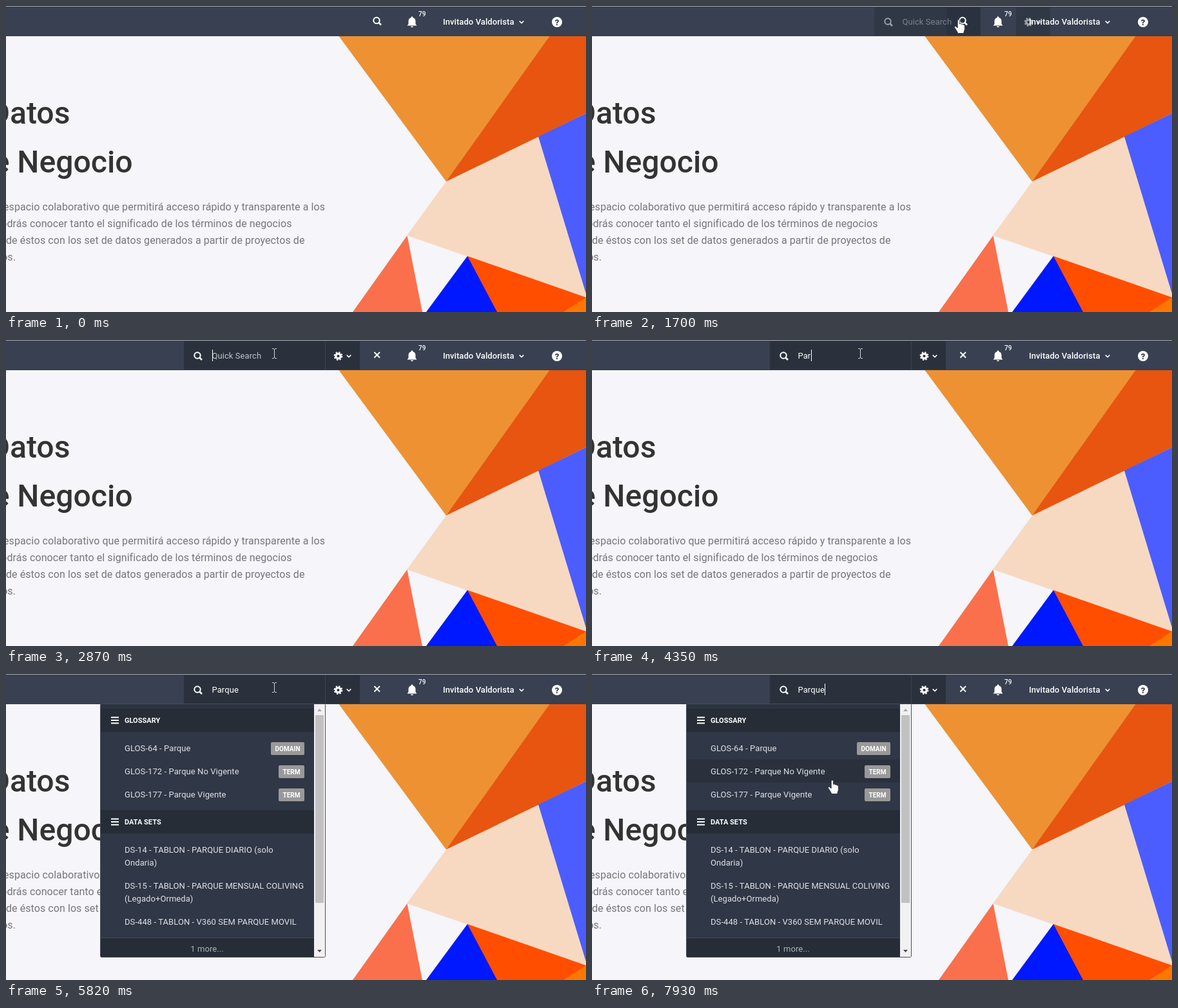
An HTML page for the animation above (8 s loop, 900 by 476 pixels).

```html
<!DOCTYPE html>
<html lang="es">
<head>
<meta charset="utf-8">
<title>Búsqueda rápida</title>
<style>
html, body { margin: 0; height: 100%; overflow: hidden; background: #f5f5fa; }
svg { display: block; width: 100vw; height: 100vh; font: 13px Roboto, sans-serif; letter-spacing: .07px; }
text { white-space: pre; }
.title { font-size: 48px; font-weight: 500; fill: #333; text-anchor: end; letter-spacing: 0; }
.body { font-size: 16px; fill: #75757b; text-anchor: end; letter-spacing: .08px; }
.head { font-size: 11px; font-weight: 700; fill: #fff; letter-spacing: 0; }
.tag { font-size: 10px; font-weight: 700; fill: #fff; text-anchor: middle; letter-spacing: 0; }
.line { fill: none; stroke: #fff; stroke-width: 2; }
</style>
</head>
<body>
<svg viewBox="0 0 900 476">
  <defs>
    <g id="lens" class="line"><circle r="4.7" cx="-1" cy="-1"/><path d="M2.5 2.5L6 6" stroke-width="2.6"/></g>
    <path id="chevron" class="line" d="M-3.3 -1.6L0 1.6L3.3 -1.6" style="stroke-width:1.5"/>
    <g id="gear"><circle r="3.7" fill="none" stroke="#fff" stroke-width="3.2"/>
      <circle r="5.9" fill="none" stroke="#fff" stroke-width="2" stroke-dasharray="2.4 2.234"/></g>
    <path id="bars" class="line" d="M0 -4.5H12M0 0H12M0 4.5H12"/>
  </defs>

  <!-- Facets overlap underneath so that no background shows at the seams -->
  <rect width="900" height="476" fill="#f5f5fa"/>
  <path fill="#f7d9c2" d="M683 273L826 203L860 220L902 454L622 357z"/>
  <path fill="#e75510" d="M830 47H900V167L826 203.5L683 273z"/>
  <path fill="#ee9133" d="M516.5 47H843.5L683 273z"/>
  <path fill="#4b5dff" d="M826 203L902 166V454z"/>
  <path fill="#fa704c" d="M622.5 357L646 476H538z"/>
  <path fill="#ff4e00" d="M716 389L902 454L880 476H730z"/>
  <path fill="#0018ff" d="M716 389L762 476H652z"/>
  <path fill="#ff7700" d="M902 452V476H865z"/>

  <text class="title" x="99.5" y="183">Datos</text>
  <text class="title" x="196.5" y="259">e Negocio</text>
  <text class="body" x="495" y="318">espacio colaborativo que permitirá acceso rápido y transparente a los</text>
  <text class="body" x="443.5" y="344">odrás conocer tanto el significado de los términos de negocios</text>
  <text class="body" x="463.5" y="370">de éstos con los set de datos generados a partir de proyectos de</text>
  <text class="body" x="15" y="396">os.</text>

  <rect width="900" height="47" fill="#384051"/>
  <rect width="900" height="1" fill="#a4a9b2"/>

  <rect id="pressed" x="550" y="2" width="53" height="44" fill="#2d3442"/>
  <g id="panel">
    <rect x="276" y="2" width="273" height="44" fill="#2a313d"/>
    <rect x="495" y="2" width="1" height="44" fill="#3a4252"/>
    <use id="panelLens" href="#lens" x="298" y="25"/>
    <circle id="spinner" class="line" r="7" stroke-dasharray="35 9" style="stroke:#d4d6da;stroke-width:1.7"/>
    <text id="query" x="319.5" y="29"></text>
    <use href="#gear" x="515.5" y="25"/>
    <use href="#chevron" x="532" y="25"/>
  </g>
  <rect id="caret" y="15" width="1" height="18" fill="#fff"/>

  <use id="openIcon" href="#lens" x="576" y="23.5"/>
  <path id="closeIcon" class="line" d="M571.5 19L580 27.5M580 19L571.5 27.5"/>
  <rect x="603" y="2" width="54" height="44" fill="#384051"/>
  <path fill="#fff" d="M622.5 30.5l2-2.5v-4.5c0-3 1.8-4.8 4.2-5.4v-.6a1.3 1.3 0 0 1 2.6 0v.6c2.4.6 4.2 2.4 4.2 5.4v4.5l2 2.5zM628 31.5h4a2 1.8 0 0 1-4 0z"/>
  <text x="640" y="16" fill="#fff" style="font-size:10px;font-weight:500">79</text>
  <text x="678" y="29" fill="#fff" style="font-weight:500">Invitado Valdorista</text>
  <use href="#chevron" x="800" y="25"/>
  <circle cx="855" cy="25" r="8" fill="#fff"/>
  <text x="855" y="29.5" fill="#384051" text-anchor="middle" style="font-weight:900">?</text>

  <g id="menu">
    <rect x="146.5" y="46.5" width="349" height="394" rx="2" fill="#303746" stroke="#454d5c"/>
    <rect x="147" y="47" width="331" height="7" fill="#2d3441"/>
    <rect id="hover" x="147" width="331" height="36" fill="#2a313d"/>
    <path fill="#262d37" d="M147 54H478V90H147zM147 212H478V248H147zM147 411H478V440H147z"/>
    <rect x="147" y="410" width="331" height="1" fill="#424957"/>
    <use href="#bars" x="163" y="72"/>
    <use href="#bars" x="163" y="230"/>
    <text class="head" x="184" y="76">GLOSSARY</text>
    <text class="head" x="184" y="234">DATA SETS</text>
    <g id="rows" fill="#dfe1e5"></g>
    <text x="312" y="432" fill="#aeb2ba" text-anchor="middle">1 more...</text>
    <rect x="478" y="47" width="17" height="393" fill="#f1f1f1"/>
    <rect x="480" y="64" width="13" height="292" fill="#c1c1c1"/>
    <path fill="#a3a3a3" d="M483 58h7l-3.5-4z"/>
    <path fill="#505050" d="M483 429h7l-3.5 4z"/>
  </g>

  <g id="cursor">
    <path id="arrow" fill="#fff" stroke="#000" d="M.5 .5V16.5L4.2 13L6.7 18.7L9 17.7L6.5 12.2H11.5z"/>
    <path id="hand" fill="#fff" stroke="#22262e" stroke-width=".8" d="M-1.8 13V1.8C-1.8 -.4 1.6 -.4 1.6 1.8V7C2.5 5.8 4.5 6.2 4.7 7.6C5.7 6.8 7.2 7.2 7.4 8.4C8.4 8 9.4 8.7 9.4 9.8V14.5C9.4 16.5 8 18 7.8 21.5H-1.4C-1.6 19.3 -3.4 17.4 -4.6 15.2L-6.6 12.2C-7.2 10.6 -5 9.8 -4 11z"/>
    <path id="beam" fill="none" stroke="#d5d7dc" d="M-3 -7.5H-1L.5 -6.5L2 -7.5H4M.5 -6.5V6.5M-3 7.5H-1L.5 6.5L2 7.5H4"/>
  </g>
</svg>
<script>
const LOOP = 8000;
const $ = id => document.getElementById(id);
const show = (id, on) => $(id).style.display = on ? "" : "none";
const clamp = v => Math.max(0, Math.min(1, v));
const within = (t, spans) => spans.some(([a, b]) => t >= a && t < b);

const rows = [
  [120, "GLOS-64 - Parque", "DOMAIN", 52], [156, "GLOS-172 - Parque No Vigente", "TERM", 40],
  [192, "GLOS-177 - Parque Vigente", "TERM", 40],
  [278, "DS-14 - TABLON - PARQUE DIARIO (solo"], [298, "Ondaria)"],
  [334, "DS-15 - TABLON - PARQUE MENSUAL COLIVING"], [354, "(Legado+Ormeda)"],
  [390, "DS-448 - TABLON - V360 SEM PARQUE MOVIL"]
];
$("rows").innerHTML = rows.map(([y, label, tag, w]) => `<text x="184" y="${y}">${label}</text>` + (tag ?
  `<rect x="${463 - w}" y="${y - 14}" width="${w}" height="20" rx="2" fill="#999"/>
   <text class="tag" x="${463 - w / 2}" y="${y}">${tag}</text>` : "")).join("");

// Cursor path: start, end, steps, from, to
const moves = [
  [150, 760, 9, 872, 377, 674, 163],
  [760, 920, 3, 674, 163, 595, 91],
  [920, 1300, 6, 595, 91, 569, 21],
  [1850, 2320, 7, 569, 21, 416, 21],
  [7140, 7930, 11, 416, 21, 373, 165]
];
const keys = [3570, 4200, 4350, 4580, 4730, 4810];
const caretOn = [[1850, 2320], [2870, 3420], [3570, 4120], [4200, 5270], [5900, 6360], [6910, 7460], [7930, LOOP]];

// Progress that advances in n - 1 equal jumps, like a screen capture
const stepped = (t, a, b, n) => clamp(Math.floor((t - a) / (b - a) * (n - 1) + .02) / (n - 1));

function cursorAt(t) {
  const [a, b, n, x0, y0, x1, y1] = moves.filter(m => t >= m[0]).pop() || moves[0];
  const p = stepped(t, a, b, n);
  return [Math.round(x0 + (x1 - x0) * p), Math.round(y0 + (y1 - y0) * p)];
}

function draw(t) {
  const [x, y] = cursorAt(t);
  const menuOpen = t >= 5820, inBar = y < 46;
  const shape = inBar ? (t > 1850 && x < 495 ? "beam" : "hand") : menuOpen && y >= 98 ? "hand" : "arrow";
  for (const s of ["arrow", "hand", "beam"]) show(s, s === shape);
  show("cursor", t >= 150);
  $("cursor").setAttribute("transform", `translate(${x} ${y})`);

  const p = stepped(t, 1530, 1870, 5), slide = p * p * (3 - 2 * p);
  show("panel", t >= 1530);
  $("panel").setAttribute("transform", `translate(${Math.round(324 * (1 - slide))} 0)`);
  $("panel").setAttribute("opacity", slide);
  show("pressed", t >= 1530 && t < 1930);
  show("openIcon", t < 1780);
  show("closeIcon", t >= 1780);

  const typed = keys.filter(k => t >= k).length;
  const query = $("query");
  query.textContent = typed ? "Parque".slice(0, typed) : "Quick Search";
  query.setAttribute("fill", typed ? "#fff" : "#bfc3c9");
  show("caret", within(t, caretOn));
  $("caret").setAttribute("x", Math.round(319.7 + (typed && query.getComputedTextLength())));

  const busy = t >= 5500 && t < 5820;
  show("spinner", busy);
  show("panelLens", !busy);
  const turn = -90 + (stepped(t, 5500, 5820, 5) - .75) * 115;
  $("spinner").setAttribute("transform", `translate(298 25) rotate(${turn})`);

  show("menu", menuOpen);
  const row = Math.floor((y - 98) / 36);
  show("hover", menuOpen && row >= 0);
  $("hover").setAttribute("y", 98 + 36 * row - 1);
}

function frame(now) {
  draw(now % LOOP);
  requestAnimationFrame(frame);
}
draw(0);
requestAnimationFrame(frame);
</script>
</body>
</html>
```
